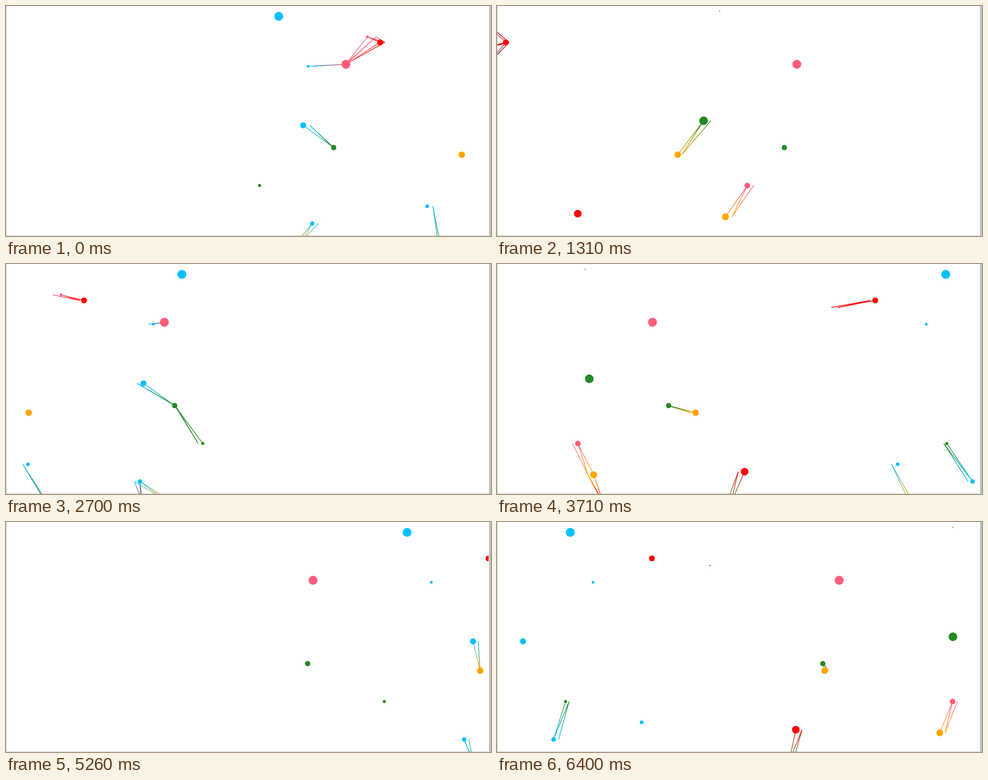
Animation of 1087 by 515 pixels, one loop 6.48 s. Source, as an HTML page with a canvas:

```html
<!DOCTYPE html>
<html lang="en">
<head>
<meta charset="utf-8">
<title>Rotating dots</title>
<style>
  html, body { margin: 0; width: 100%; height: 100%; overflow: hidden; background: #fff; }
  canvas { display: block; }
</style>
</head>
<body>
<canvas id="stage" width="1087" height="515"></canvas>
<script>
const ctx = document.getElementById('stage').getContext('2d');
const LOOP = 6480, CENTER = 549.6, REACH = 110, TRAIL = 1.05;
const BLUE = '#00bfff', GREEN = '#228b22', ORANGE = '#ffa500', RED = '#ff0000', PINK = '#ff5c7a';

// Each dot orbits a vertical axis: [y, radius, colour, cosine part, sine part], in update order.
const dots = [
  [12, 1.4, PINK, -50.6, -845],
  [23.3, 10, BLUE, -591, -140],
  [97.3, 1.4, RED, -597, -664],
  [487, 5, BLUE, -707.5, -231],
  [402, 6.3, PINK, 11.4, -763],
  [257, 9.7, GREEN, -86.6, -893],
  [130.5, 10, PINK, 122.4, -198],
  [317, 5.9, GREEN, 94.4, -174],
  [69, 3, PINK, -1037, -399],
  [135, 3, BLUE, -576, -204.5],
  [535, 5, GREEN, -211, -451],
  [526, 5, ORANGE, -521, -174],
  [531, 5, RED, 219, -254],
  [81.5, 6.6, RED, -529.6, -361],
  [333, 7.3, ORANGE, -144.6, -495],
  [472, 7.7, ORANGE, -37.6, -780],
  [402, 3.4, GREEN, -569, -93.7],
  [465, 8.6, RED, -368.6, -682],
  [267.3, 6.7, BLUE, -786, -221],
  [448.5, 4, BLUE, -651.7, -483.5]
].map(([y, r, color, cos, sin]) => ({ y, r, color, cos, sin }));

// The picture advances in uneven steps; every mark opens a run of nine of them.
const marks = [70, 760, 1460, 2150, 2850, 3560, 4250, 4940, 5630, 6320, 7020];

function stepAt(time) {
  let run = 0;
  while (run < 9 && time >= marks[run + 1]) run++;
  const length = (marks[run + 1] - marks[run]) / 9;
  return Math.min(83, 1 + 9 * run + Math.floor((time - marks[run] + 7) / length));
}

const turns = [[0, -82.5], [17, 0], [35, 88.5], [48, 152], [56, 191.2], [68, 248.2], [83, 322.7]];

function angleAt(step) {
  let i = 0;
  while (i < turns.length - 2 && step >= turns[i + 1][0]) i++;
  const [from, a] = turns[i], [to, b] = turns[i + 1];
  return a + (b - a) * (step - from) / (to - from);
}

function place(dot, degrees) {
  const a = degrees * Math.PI / 180;
  return CENTER + dot.cos * Math.cos(a) + dot.sin * Math.sin(a);
}

function link(a, ax, b, bx) {
  if (Math.hypot(ax - bx, a.y - b.y) > REACH) return;
  const blend = ctx.createLinearGradient(ax, a.y, bx, b.y);
  blend.addColorStop(0, a.color);
  blend.addColorStop(1, b.color);
  ctx.strokeStyle = blend;
  ctx.beginPath();
  ctx.moveTo(ax, a.y);
  ctx.lineTo(bx, b.y);
  ctx.stroke();
}

function draw(step) {
  const angle = angleAt(step), last = dots.length - 1;
  for (const dot of dots) {
    dot.x = place(dot, angle);
    dot.oldX = place(dot, angle - TRAIL);
  }

  ctx.fillStyle = '#fff';
  ctx.fillRect(0, 0, 1087, 515);
  ctx.fillStyle = '#c0c0c0';
  ctx.fillRect(0, 0, 1, 515);
  ctx.fillRect(1082.5, 0, 4.5, 515);
  ctx.fillRect(0, 514, 1087, 1);

  ctx.save();
  ctx.beginPath();
  ctx.rect(1, 0, 1080.5, 515);
  ctx.clip();
  ctx.lineWidth = 1.4;
  dots.forEach((a, i) => {
    for (let j = i + 1; j <= last; j++) {
      const b = dots[j];
      link(a, a.oldX, b, b.oldX);
      link(a, a.x, b, b.oldX);
      if (j < last) link(a, a.x, b, b.x);
    }
  });
  for (const dot of dots) {
    ctx.fillStyle = dot.color;
    ctx.beginPath();
    ctx.arc(dot.x, dot.y, dot.r, 0, 2 * Math.PI);
    ctx.fill();
  }
  ctx.restore();
}

const start = performance.now();
function tick() {
  draw(stepAt((performance.now() - start) % LOOP));
  requestAnimationFrame(tick);
}
tick();
</script>
</body>
</html>
```
